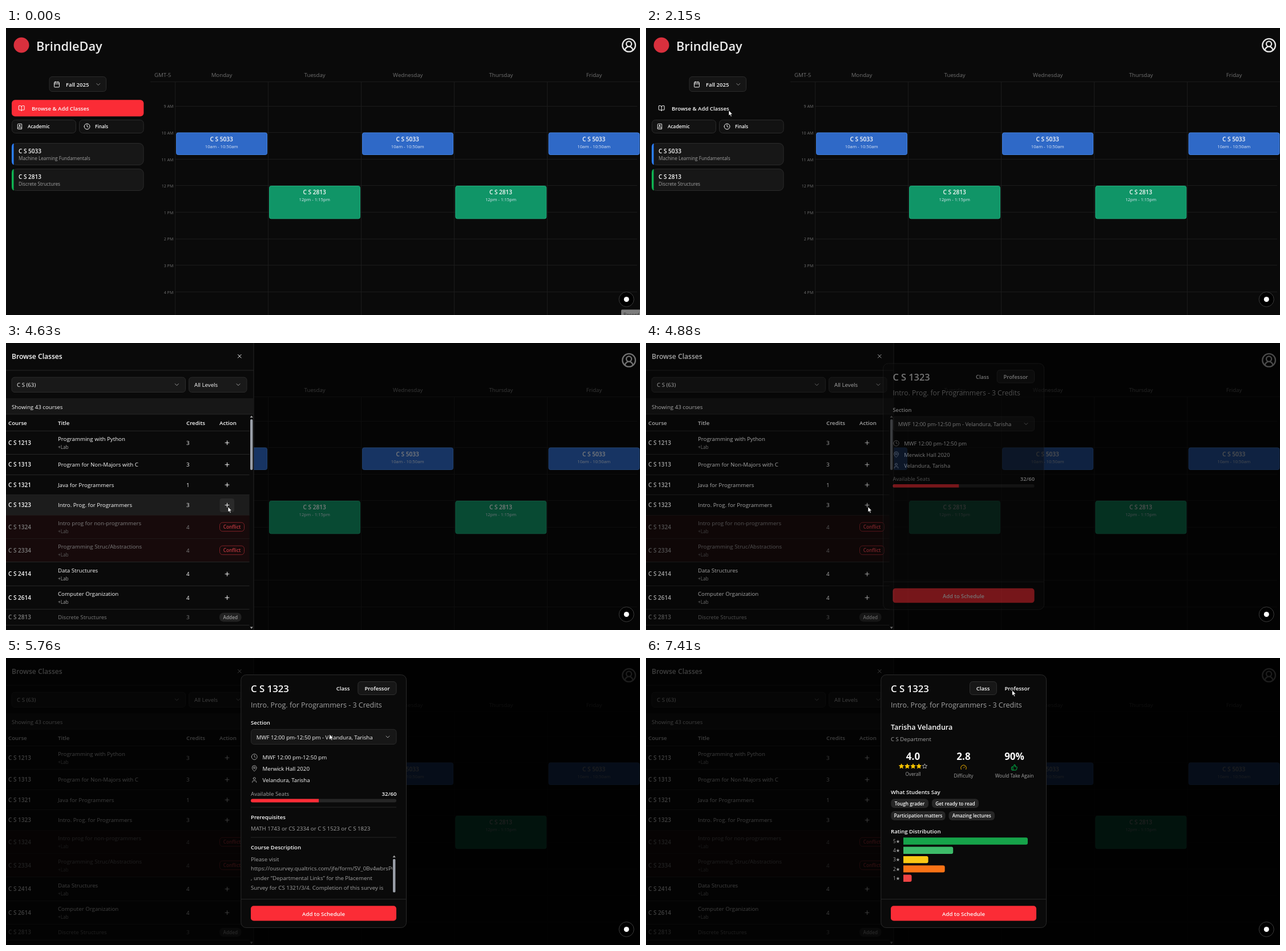
An HTML page for the animation above (8000 ms loop, 1111x504 px).

```html
<!DOCTYPE html>
<html lang="en">
<head>
<meta charset="utf-8">
<title>Class planner</title>
<style>
html, body { margin: 0; width: 100%; height: 100%; overflow: hidden; background: #0a0a0a; }
svg { display: block; width: 1111px; height: 504px; }
text { font-family: "Open Sans", "Noto Sans", sans-serif; white-space: pre; }
</style>
</head>
<body>
<svg id="stage" viewBox="0 0 1111 504"></svg>
<script>
const LOOP = 8000;
const RED = '#fb2c36', GRAY = '#a3a3a3', WHITE = '#fafafa', LINE = '#262626', BG = '#0a0a0a';
const SM = 9.7, XS = 8.25;

// --- drawing helpers ---
const text = (x, y, str, { size = SM, w = 400, fill = WHITE, at = 'start' } = {}) =>
  `<text x="${x}" y="${y}" font-size="${size}" font-weight="${w}" fill="${fill}" text-anchor="${at}">${str}</text>`;
const bold = (x, y, str, o = {}) => text(x, y, str, { size: 9.6, w: 600, ...o });
const box = (x, y, x2, y2, r, fill, stroke = 'none', extra = '') =>
  `<rect x="${x}" y="${y}" width="${x2 - x}" height="${y2 - y}" rx="${r}" fill="${fill}" stroke="${stroke}" ${extra}/>`;
const hline = (x, x2, y, c = LINE) => `<path d="M${x} ${y}H${x2}" stroke="${c}"/>`;
const vline = (x, y, y2, c = LINE) => `<path d="M${x} ${y}V${y2}" stroke="${c}"/>`;
const group = (id, body, attrs = '') => `<g id="${id}" ${attrs}>${body}</g>`;
const ring = (x, y, r) => `M${x - r} ${y}a${r} ${r} 0 1 0 ${2 * r} 0a${r} ${r} 0 1 0 ${-2 * r} 0`;

const ICONS = {
  calendar: 'M8 2v4M16 2v4M3 10h18M5 4h14a2 2 0 0 1 2 2v14a2 2 0 0 1-2 2H5a2 2 0 0 1-2-2V6a2 2 0 0 1 2-2z',
  chevron: 'm6 9 6 6 6-6',
  book: 'M12 7v14M3 18a1 1 0 0 1-1-1V4a1 1 0 0 1 1-1h5a4 4 0 0 1 4 4 4 4 0 0 1 4-4h5a1 1 0 0 1 1 1v13a1 1 0 0 1-1 1h-6a3 3 0 0 0-3 3 3 3 0 0 0-3-3z',
  academic: 'M15 13a3 3 0 1 0-6 0M4 19.5v-15A2.5 2.5 0 0 1 6.5 2H19a1 1 0 0 1 1 1v18a1 1 0 0 1-1 1H6.5a1 1 0 0 1 0-5H20' + ring(12, 8, 2),
  clock: ring(12, 12, 10) + 'M12 6v6l4 2',
  pin: 'M20 10c0 5-5.5 10.2-7.4 11.8a1 1 0 0 1-1.2 0C9.5 20.2 4 15 4 10a8 8 0 0 1 16 0' + ring(12, 10, 3),
  user: 'M19 21v-2a4 4 0 0 0-4-4H9a4 4 0 0 0-4 4v2' + ring(12, 7, 4),
  account: 'M18 20a6 6 0 0 0-12 0' + ring(12, 10, 4) + ring(12, 12, 10),
  gauge: 'm12 14 4-4M3.34 19a10 10 0 1 1 17.32 0',
  thumb: 'M7 10v12M15 5.88 14 10h5.83a2 2 0 0 1 1.92 2.56l-2.33 8A2 2 0 0 1 17.5 22H4a2 2 0 0 1-2-2v-8a2 2 0 0 1 2-2h2.76a2 2 0 0 0 1.79-1.11L12 2a3.13 3.13 0 0 1 3 3.88Z',
  plus: 'M5 12h14M12 5v14',
  close: 'M18 6 6 18M6 6l12 12'
};
const icon = (name, cx, cy, size = 11.8, color = WHITE) =>
  `<path d="${ICONS[name]}" transform="translate(${cx - size / 2} ${cy - size / 2}) scale(${size / 24})" fill="none" stroke="${color}" stroke-width="2" stroke-linecap="round" stroke-linejoin="round"/>`;

const star = (cx, cy, filled) => {
  const pts = Array.from({ length: 10 }, (_, i) => {
    const a = i * Math.PI / 5 - Math.PI / 2, r = i % 2 ? 2 : 4.4;
    return (cx + r * Math.cos(a)).toFixed(2) + ',' + (cy + r * Math.sin(a)).toFixed(2);
  }).join(' ');
  return `<polygon points="${pts}" stroke-width=".8" stroke-linejoin="round" fill="${filled ? '#fdc700' : 'none'}" stroke="${filled ? '#fdc700' : '#d4d4d4'}"/>`;
};

// --- schedule page ---
function sideCard(y, code, name, color) {
  return box(10.5, y + .5, 241, y + 38.5, 8, '#171717', '#2b2b2b') +
    `<path d="M13.5 ${y + .6}Q10 ${y + 2} 10 ${y + 8}v23q0 6 3.5 7.4z" fill="${color}"/>` +
    bold(22, y + 18, code, { size: 10 }) + text(22, y + 30.2, name, { size: XS, fill: GRAY });
}

function lesson(x, y, h, code, hours, fill, edge) {
  return box(x + .5, y + .5, x + 159.5, y + h - .5, 3, fill, edge) +
    bold(x + 79.7, y + 15.3, code, { size: 10.1, at: 'middle' }) +
    text(x + 79.7, y + 27, hours, { size: 7.7, fill: '#dfe8f5', at: 'middle' });
}

function page() {
  let s = `<circle cx="27" cy="30" r="13.5" fill="#d8303d"/>` +
    bold(53, 40, 'BrindleDay', { size: 21.7, fill: '#ececec' }) +
    icon('account', 1091.6, 30.3, 27.3, '#e5e5e5');

  s += box(76, 85.5, 175.5, 111.5, 5, '#151515', '#2b2b2b') + icon('calendar', 89, 99) +
    bold(105, 102.8, 'Fall 2025') + icon('chevron', 161.7, 99, 11.8, '#8c8c8c');

  s += group('browse', box(10, 126.3, 241.3, 155.3, 6, RED)) + icon('book', 27.2, 141) +
    bold(45, 145.3, 'Browse &amp; Add Classes');
  s += box(10.5, 161.5, 122.5, 184.5, 6, '#121212', '#2b2b2b') + icon('academic', 24, 173, 11) +
    bold(38, 176.3, 'Academic', { size: 8.3 });
  s += box(128.5, 161.5, 241, 184.5, 6, '#121212', '#2b2b2b') + icon('clock', 142, 173) +
    bold(156, 176.3, 'Finals', { size: 8.3 });
  s += sideCard(202, 'C S 5033', 'Machine Learning Fundamentals', '#2b7fff') +
    sideCard(247, 'C S 2813', 'Discrete Structures', '#0fb452');

  const grid = '#1b1b1b', dim = '#717171', colW = 163.15;
  s += text(274.7, 85.6, 'GMT-5', { fill: dim, at: 'middle' }) + hline(253, 1111, 94.5, grid);
  ['Monday', 'Tuesday', 'Wednesday', 'Thursday', 'Friday'].forEach((day, i) => {
    s += text(378 + i * colW, 85.6, day, { fill: dim, at: 'middle' }) +
      vline(Math.floor(296 + i * colW) + .5, 95, 504, grid);
  });
  for (let i = 0; i < 8; i++) {
    const y = 137 + i * 46.6, h = 9 + i;
    s += hline(296, 1106, Math.floor(y) + .5, grid) +
      text(293.3, y + 3.4, `${h > 12 ? h - 12 : h} ${h < 12 ? 'AM' : 'PM'}`, { size: 7.1, fill: dim, at: 'end' });
  }
  [298, 624, 950.5].forEach(x => s += lesson(x, 183.5, 39.5, 'C S 5033', '10am - 10:50am', '#2f69c7', '#4180de'));
  [461, 787.3].forEach(x => s += lesson(x, 277, 58.3, 'C S 2813', '12pm - 1:15pm', '#109567', '#1eae7c'));
  return s;
}

// --- drawer with the course list ---
const ROWS = [
  [154.5, 195.5, '1213', 'Programming with Python', 3, 'lab'],
  [195.5, 231.5, '1313', 'Program for Non-Majors with C', 3],
  [231.5, 266.5, '1321', 'Java for Programmers', 1],
  [266.5, 302.5, '1323', 'Intro. Prog. for Programmers', 3],
  [302.5, 343.5, '1324', 'Intro prog for non-programmers', 4, 'lab', 'conflict'],
  [343.5, 384.5, '2334', 'Programming Struc/Abstractions', 4, 'lab', 'conflict'],
  [384.5, 426.5, '2414', 'Data Structures', 4, 'lab'],
  [426.5, 467.5, '2614', 'Computer Organization', 4, 'lab'],
  [467.5, 495.5, '2813', 'Discrete Structures', 3, '', 'added']
];

function courseRow([top, bottom, code, title, credits, lab, state], i) {
  const mid = (top + bottom) / 2 + .2, fill = state ? '#7d7d7d' : WHITE;
  let s = state === 'conflict' ? box(0, top, 426.5, bottom, 0, '#170a0b') : '';
  s += box(0, top, 426.5, bottom, 0, '#1c1c1c', 'none', `id="row${i}" opacity="0"`);
  if (i === 3) s += box(374.5, 273, 400, 297, 4, '#2a2a2a', 'none', 'id="addHover" opacity="0"');
  s += bold(4, mid + 3.7, 'C S ' + code, { size: 10, fill }) +
    text(91, mid + (lab ? -3 : 3.6), title, { fill }) +
    (lab ? text(91, mid + 11.2, '+Lab', { size: XS, fill: state ? '#5c5c5c' : GRAY }) : '') +
    text(316, mid + 3.6, credits, { fill });
  if (state === 'conflict') {
    s += box(374.5, mid - 8, 417.5, mid + 7.5, 5, 'none', '#7d2126') +
      bold(396, mid + 3.2, 'Conflict', { size: XS, fill: '#c23a41', at: 'middle' });
  } else if (state === 'added') {
    s += box(374, mid - 8, 412.5, mid + 7.7, 7, '#222') +
      bold(393.3, mid + 3.2, 'Added', { size: XS, fill: '#9a9a9a', at: 'middle' });
  } else {
    s += icon('plus', 387.5, mid);
  }
  return s + hline(0, 426.5, bottom);
}

function drawer() {
  let s = box(-1, -1, 434, 505, 0, BG) + vline(434, 0, 504) +
    bold(10, 27.6, 'Browse Classes', { size: 12.1 }) + icon('close', 409.3, 23.2, 11.5) + hline(0, 434, 48);
  s += box(10, 60.2, 314.5, 86.5, 5, '#191919', '#2b2b2b') + text(19, 77, 'C S (63)') + icon('chevron', 299.3, 73.2, 11.8, GRAY);
  s += box(320.5, 60.2, 422, 86.5, 5, '#191919', '#2b2b2b') + text(330, 77, 'All Levels') + icon('chevron', 407, 73.2, 11.8, GRAY);
  s += box(0, 97, 433.5, 125, 0, '#171717') + hline(0, 433.5, 125) + text(10, 115.6, 'Showing 43 courses');
  [[4, 'Course'], [91, 'Title'], [316, 'Credits'], [374, 'Action']].forEach(([x, t]) => s += bold(x, 143.7, t, { size: SM }));
  s += hline(0, 426.5, 154.5) + ROWS.map(courseRow).join('');
  return s + box(428, 134, 432.4, 223, 2, '#9a9fa8') +
    '<path d="M427.6 131l2.6-3.6 2.6 3.6zM427.6 498.4l2.6 3.6 2.6-3.6z" fill="#a2a2a2"/>';
}

// --- course dialog ---
const NAME = ['Tarisha', 'Velandura'];

function classTab() {
  const last = `${NAME[1]}, ${NAME[0]}`, hours = 'MWF 12:00 pm-12:50 pm';
  let s = bold(429, 116.6, 'Section') + box(429.5, 125.3, 684, 151.5, 5, '#171717', '#2a2a2a') +
    text(438.7, 142.6, `${hours} - ${last}`) + icon('chevron', 669, 138.5, 11.8, GRAY);
  [['clock', hours], ['pin', 'Merwick Hall 2020'], ['user', last]].forEach(([name, t], i) => {
    s += icon(name, 435.2, 173.5 + i * 20.3, 11.8, GRAY) + text(449.5, 177.5 + i * 20.3, t);
  });
  s += text(429, 241.6, 'Available Seats', { fill: GRAY }) + bold(684.5, 241.6, '32/60', { size: SM, at: 'end' }) +
    box(429, 247.4, 684, 253.4, 3, LINE) +
    `<path d="M548 247.4H432a3 3 0 0 0 0 6H548z" fill="${RED}"/>`;

  let more = hline(429, 684, 262) + bold(429, 282.8, 'Prerequisites') +
    text(429, 303, 'MATH 1743 or CS 2334 or C S 1523 or C S 1823', { fill: GRAY }) +
    hline(429, 684, 315) + bold(429, 335.6, 'Course Description');
  const lines = ['Please visit', 'https://ousurvey.qualtrics.com/jfe/form/SV_0Bv4wbrsP0',
    ', under “Departmental Links” for the Placement', 'Survey for CS 1321/3/4. Completion of this survey is'];
  more += '<g clip-path="url(#para)">' +
    lines.map((t, i) => text(429, 356.7 + i * 16.75, t, { fill: GRAY })).join('') + '</g>' +
    box(678, 353, 682.4, 411.5, 1.5, '#9a9fa8') + '<path d="M677.6 350.2l2.6-3.6 2.6 3.6z" fill="#a2a2a2"/>';
  return s + group('more', more);
}

const BARS = [[15, '#16a34a'], [6, '#3dbb69'], [3, '#fbc814'], [5, '#f97316'], [1, '#ef4444']];

function professorTab() {
  const mid = { at: 'middle' }, big = { size: 17, w: 700, at: 'middle' }, note = { size: XS, fill: GRAY, at: 'middle' };
  let s = bold(429, 125.6, NAME.join(' '), { size: 12.5 }) + text(429, 145.5, 'C S Department', { fill: GRAY, size: 9.6 });
  s += bold(468, 178.6, '4.0', big) + bold(556.5, 178.6, '2.8', big) + bold(645.5, 178.6, '90%', big);
  for (let i = 0; i < 5; i++) s += star(447.6 + i * 10.2, 190.2, i < 4);
  s += icon('gauge', 556.5, 192, 11.8, '#f0b100') + icon('thumb', 645.5, 192, 11.8, '#00b84a');
  s += text(468, 207, 'Overall', note) + text(556.5, 209.8, 'Difficulty', note) + text(645.5, 209.8, 'Would Take Again', note);
  s += bold(429, 238.6, 'What Students Say');
  [[429.3, 495, 247.3, 'Tough grader'], [501, 583, 247.3, 'Get ready to read'],
   [429.3, 524.5, 269, 'Participation matters'], [530.5, 611, 269, 'Amazing lectures']].forEach(([x, x2, y, t]) => {
    s += box(x, y, x2, y + 16, 6, LINE) + bold((x + x2) / 2, y + 11.3, t, { size: XS, ...mid });
  });
  s += bold(429, 307.8, 'Rating Distribution');
  BARS.forEach(([, color], i) => {
    s += text(433, 324.6 + i * 16.3, `${5 - i}★`, { size: XS, fill: GRAY }) + `<path id="bar${i}" fill="${color}"/>`;
  });
  return s;
}

function dialog() {
  const tab = id => group(id, id === 'classBox'
    ? box(567.5, 41.5, 614.3, 64.5, 5, '#171717', '#303030') : box(616.8, 41.5, 684, 64.5, 5, '#171717', '#303030'));
  return box(411.8, 29.5, 701.5, 473.5, 9, BG, '#2a2a2a') +
    bold(429, 60, 'C S 1323', { size: 16.8 }) +
    tab('classBox') + box(567, 41, 613.7, 64.7, 5, RED, 'none', 'id="classRed"') + tab('profBox') +
    bold(590.5, 57.2, 'Class', { at: 'middle' }) + bold(650.5, 57.2, 'Professor', { at: 'middle' }) +
    text(429, 87, 'Intro. Prog. for Programmers - 3 Credits', { size: 12.5, fill: GRAY }) +
    group('classTab', classTab()) + group('profTab', professorTab()) +
    hline(412, 701.5, 423.5) + box(429, 435.3, 684, 461.5, 5, RED) +
    bold(556.5, 452.6, 'Add to Schedule', { at: 'middle' });
}

const stage = document.getElementById('stage');
stage.innerHTML =
  '<defs><clipPath id="para"><rect x="428" y="344" width="249" height="68"/></clipPath></defs>' +
  box(0, 0, 1111, 504, 0, BG) + page() +
  box(0, 0, 1111, 504, 0, '#000', 'none', 'id="shade1"') + group('drawer', drawer()) +
  box(0, 0, 1111, 504, 0, '#000', 'none', 'id="shade2"') + group('dialog', dialog()) +
  '<circle cx="1087.3" cy="476.5" r="13" fill="#000" stroke="#3d3d3d"/><circle cx="1087.3" cy="476.5" r="4.5" fill="#fff"/>' +
  group('tip', box(1078, 494.5, 1120, 520, 2, '#7d7d7d') + text(1082, 506.5, 'Record', { size: 8.5, fill: '#2a2a2a' })) +
  '<circle id="click" r="7" fill="#e6cb00" opacity="0"/>' +
  group('cursor',
    '<path id="arrow" d="M0 0V9.6L2.2 7.7 3.8 11.2 5.3 10.5 3.8 7.1H6.8Z"/>' +
    '<path id="hand" d="M-1 1Q0-.6 1 1V5Q2 4.400 2.800 5.100 3.600 4.700 4.300 5.500 5.500 5.300 5.500 6.600V9.500Q5.300 11.500 4.300 13H-.4Q-1.500 11-3.200 8.700-3.300 7.200-1.900 7.500L-1 8.300Z"/>',
    'fill="#fff" stroke="#000" stroke-width=".7"');

// --- motion ---
const parts = {};
stage.querySelectorAll('[id]').forEach(el => parts[el.id] = el);
const set = (id, name, v) => parts[id].setAttribute(name, v);
const fade = (id, v) => set(id, 'opacity', +v);
const ramp = (t, a, b) => Math.min(1, Math.max(0, (t - a) / (b - a)));
const smooth = s => s * s * (3 - 2 * s);
const linear = s => s;
const easeOut = s => 1 - (1 - s) ** 1.5;

// begin, end, x, y, easing
const MOVES = [
  [235, 1320, 145, 144.5, easeOut],
  [2750, 3100, 126, 237, linear],
  [3100, 3240, 131, 251, linear],
  [3240, 3980, 389, 287.5, smooth],
  [5240, 6040, 636, 74, smooth],
  [6060, 6200, 640, 60, smooth],
  [6340, 6410, 641.5, 56.5, smooth]
];
const CLICKS = [[2005, 2140], [4465, 4620], [6785, 6910]];

function cursorAt(t) {
  let x = 989, y = 500;
  for (const [a, b, tx, ty, ease] of MOVES) {
    if (t < a) break;
    const k = ease(ramp(t, a, b));
    x += (tx - x) * k;
    y += (ty - y) * k;
  }
  return [x, y];
}

function render(t) {
  fade('tip', t < 40 ? 1 : t < 80 ? .45 : 0);
  fade('browse', (1 - .1 * ramp(t, 1200, 1320)) * (1 - ramp(t, 1990, 2145)));

  const open = smooth(ramp(t, 2400, 2920));
  set('drawer', 'transform', `translate(${-436 * (1 - open)} 0)`);
  fade('shade1', .5 * open);

  const lagY = cursorAt(t - 80)[1], listLive = t > 2900 && t < 4830;
  ROWS.forEach(([top, bottom], i) => fade('row' + i, listLive && lagY >= top && lagY < bottom));
  fade('addHover', listLive ? ramp(t, 3850, 3980) : 0);

  const pop = easeOut(ramp(t, 4820, 5000)), zoom = .95 + .05 * pop;
  fade('shade2', .75 * pop);
  fade('dialog', pop);
  set('dialog', 'transform', `translate(556.6 ${t < 5040 ? 252 : 251.5}) scale(${zoom}) translate(-556.6 -251.5)`);
  fade('more', t >= 5040);

  const swap = ramp(t, 6850, 7000);
  fade('classRed', t < 6785 ? 0 : .5 * (1 - swap));
  fade('classBox', swap);
  fade('profBox', 1 - swap);
  fade('classTab', t < 6850);
  fade('profTab', t >= 6850);
  const grow = smooth(ramp(t, 6870, 7400));
  BARS.forEach(([n], i) => {
    const w = Math.max(0, n * 14.53 * grow - 3);
    set('bar' + i, 'd', `M451 ${315.3 + i * 16.3}h${w}a3 3 0 0 1 3 3v6.400a3 3 0 0 1-3 3h${-w}z`);
  });

  const [x, y] = cursorAt(t), hand = t >= 2900 && t < 4050;
  set('cursor', 'transform', `translate(${x} ${y})`);
  fade('cursor', t >= 235);
  fade('arrow', !hand);
  fade('hand', hand);
  set('click', 'cx', x);
  set('click', 'cy', y);
  fade('click', CLICKS.some(([a, b]) => t >= a && t < b) ? .8 : 0);
}

const start = performance.now();
function tick() {
  render((performance.now() - start) % LOOP);
  requestAnimationFrame(tick);
}
tick();
</script>
</body>
</html>
```
